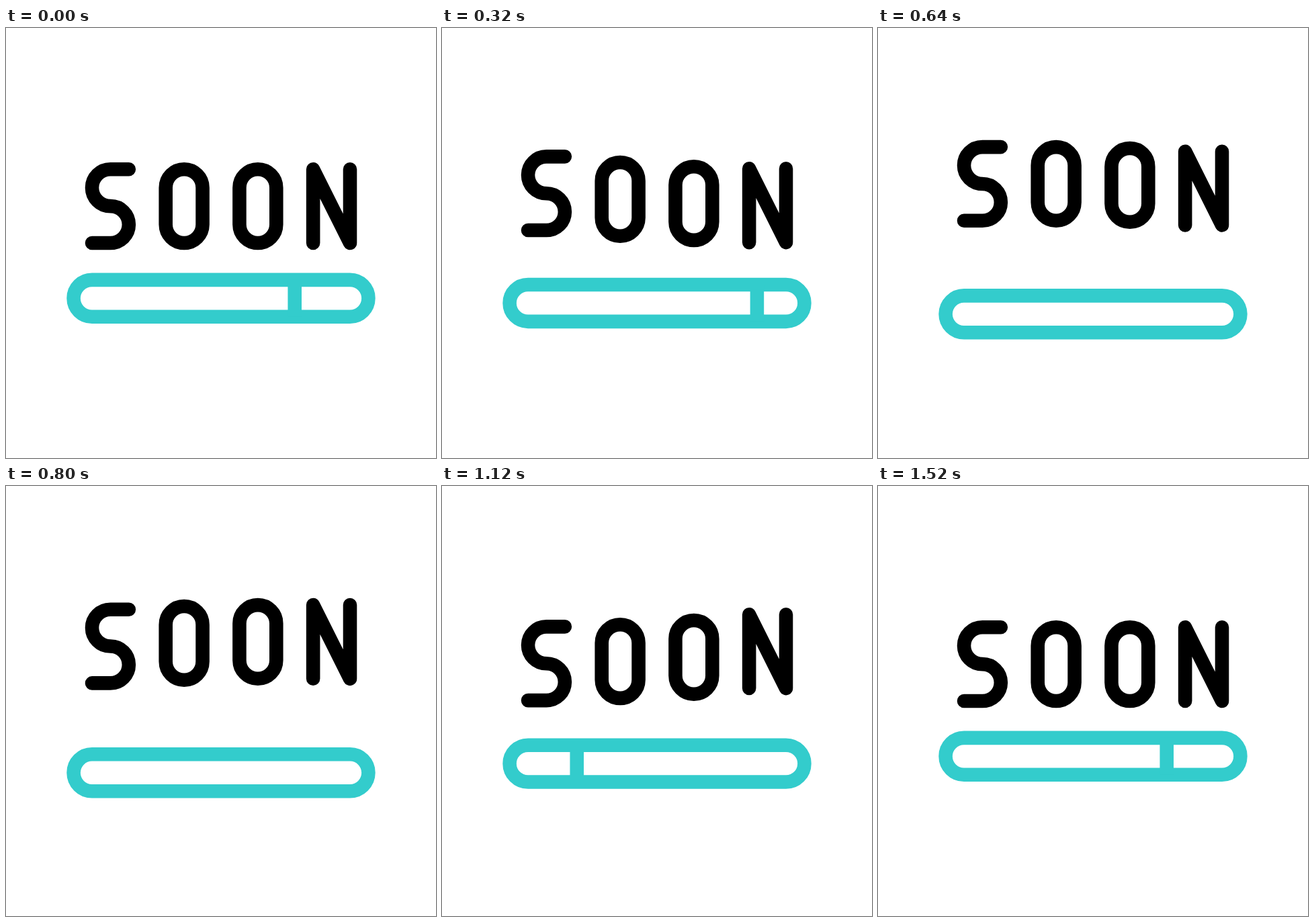
Animation of 640 by 640 pixels, one loop 1560 ms. Source, as an HTML page with a canvas:

```html
<!DOCTYPE html>
<html lang="en">
<head>
<meta charset="utf-8">
<title>Soon</title>
<style>
  html, body { margin: 0; width: 100%; height: 100%; overflow: hidden; background: #fff; }
  canvas { display: block; width: 640px; height: 640px; }
</style>
</head>
<body>
<canvas id="stage" width="640" height="640"></canvas>
<script>
const ctx = document.getElementById('stage').getContext('2d');
const LOOP = 1560, STEP = 40;
const U = 48 / 7;            // design grid unit
const TEAL = '#33cccc';
const REST_X = 320 + 16 * U; // resting place of the slider

// Ease in and out along cubic-bezier(.5, 0, .5, 1).
function ease(x) {
  x = Math.min(1, Math.max(0, x));
  let lo = 0, hi = 1;
  for (let i = 0; i < 30; i++) {
    const s = (lo + hi) / 2;
    if (1.5 * s * (1 - s) + s ** 3 < x) lo = s; else hi = s;
  }
  return lo * lo * (3 - 2 * lo);
}

// Rises from 0 to 1 between start and peak, and falls back to 0 by end.
function swing(t, start, peak, end) {
  return t < peak ? ease((t - start) / (peak - start)) : ease((end - t) / (end - peak));
}

// Letters are drawn in a box 8 units wide and 16 units high.
function drawS() {
  ctx.moveTo(8 * U, 0);
  ctx.lineTo(4 * U, 0);
  ctx.arc(4 * U, 4 * U, 4 * U, -Math.PI / 2, Math.PI / 2, true);
  ctx.arc(4 * U, 12 * U, 4 * U, -Math.PI / 2, Math.PI / 2);
  ctx.lineTo(0, 16 * U);
}

function drawO() {
  ctx.roundRect(0, 0, 8 * U, 16 * U, 4 * U);
}

function drawN() {
  ctx.moveTo(0, 16 * U);
  ctx.lineTo(0, 0);
  ctx.lineTo(8 * U, 16 * U);
  ctx.lineTo(8 * U, 0);
}

const letters = [drawS, drawO, drawO, drawN];

// The slider speeds out on the right and comes back in from the left.
function sliderX(t) {
  if (t < 780) return REST_X + 39.2 * (t / 320) ** 2.2;
  const left = Math.max(0, 1520 - t);
  return REST_X - 229 * (left / 400) ** 2.33;
}

function drawBar(t) {
  const x = 320 - 32 * U, y = 320 + 8 * U + 24.6 * swing(t, 40, 760, 1440);
  ctx.save();
  ctx.beginPath();
  ctx.roundRect(x, y, 64 * U, 8 * U, 4 * U);
  ctx.strokeStyle = TEAL;
  ctx.stroke();
  ctx.clip();
  ctx.fillStyle = TEAL;
  ctx.fillRect(sliderX(t) - 1.5 * U, y, 3 * U, 8 * U);
  ctx.restore();
}

function draw(t) {
  ctx.fillStyle = '#fff';
  ctx.fillRect(0, 0, 640, 640);
  ctx.lineWidth = 3 * U;
  ctx.lineCap = ctx.lineJoin = 'round';
  ctx.strokeStyle = '#000';
  letters.forEach((trace, i) => {
    const delay = i * 80;
    const lift = 33.4 * swing(t - delay, 0, 600, 1200);
    ctx.save();
    ctx.translate(320 + (16 * i - 28) * U, 320 - 16 * U - lift);
    ctx.beginPath();
    trace();
    ctx.stroke();
    ctx.restore();
  });
  drawBar(t);
}

function tick() {
  const t = performance.now() % LOOP;
  draw(Math.floor(t / STEP) * STEP);
  requestAnimationFrame(tick);
}
tick();
</script>
</body>
</html>
```
